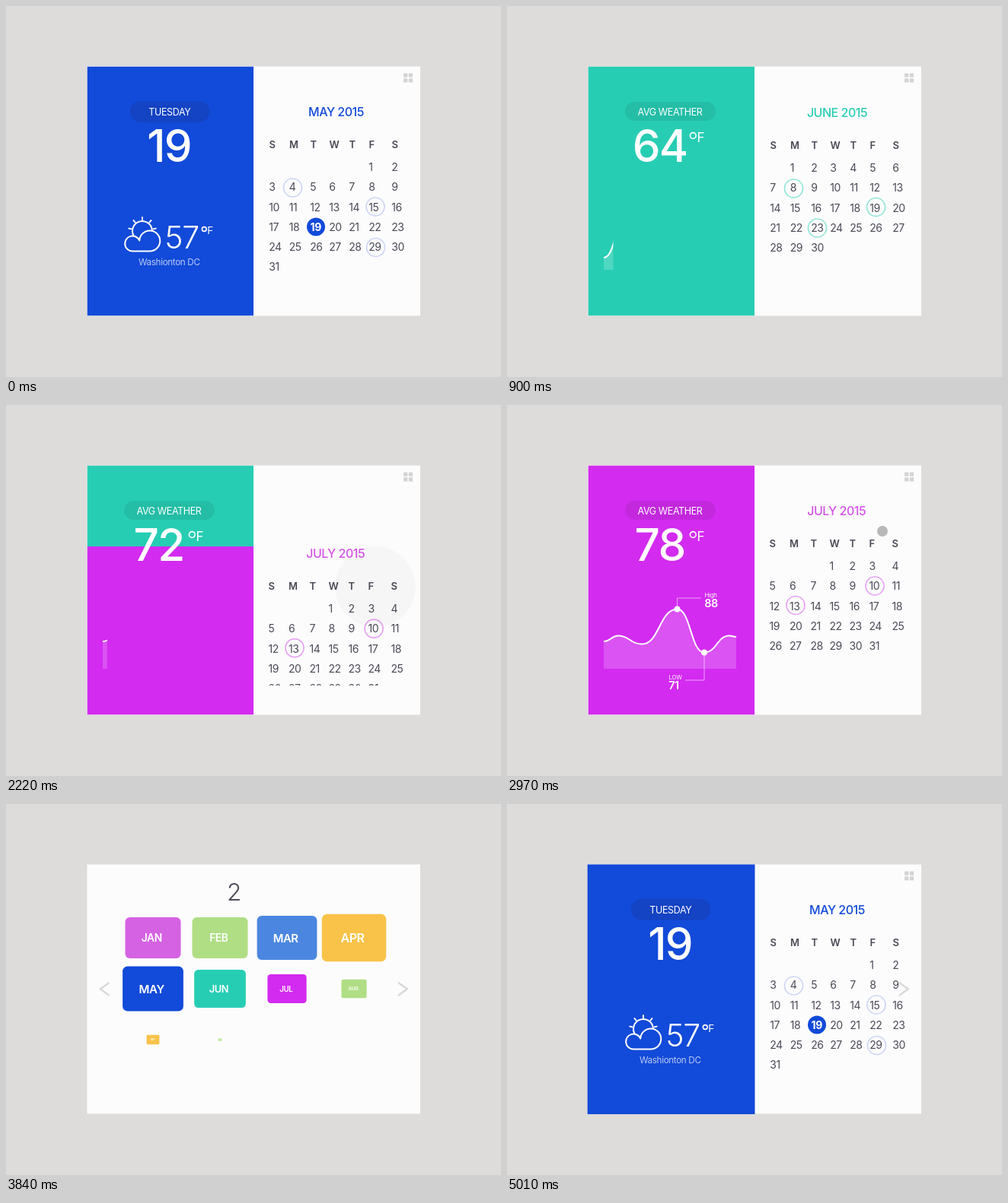
An HTML page with a canvas for the animation above (5.4 s loop, 650 by 488 pixels).

```html
<!DOCTYPE html>
<html lang="en">
<head>
<meta charset="utf-8">
<title>Calendar</title>
<style>
  html, body { margin: 0; width: 100%; height: 100%; overflow: hidden; background: #dddcda; }
  canvas { display: block; }
</style>
</head>
<body>
<canvas width="650" height="488"></canvas>
<script>
const ctx = document.querySelector('canvas').getContext('2d');
const LOOP = 5400, STEP = 30;
const CARD = { x: 106.5, y: 79.5, w: 437.5, h: 328, left: 218.5 };
const BLUE = '#124ad9', GREEN = '#27cdb3', PURPLE = '#d32bf0';
const COLUMNS = [346, 372.5, 400, 425, 451, 477, 507];

const MAY = {
  title: 'MAY 2015', color: BLUE, ink: BLUE, tint: '#cdd6f5', first: 5, days: 31, today: 19,
  dx: 0, dy: 0, rings: [[376.5, 239], [485, 264], [485.5, 317.5]]
};
const JUNE = {
  title: 'JUNE 2015', color: GREEN, ink: GREEN, tint: '#93e6d8', first: 1, days: 30,
  dx: 0, dy: 1, rings: [[376.5, 240], [484.5, 264.5], [407.5, 292]],
  start: 802, count: [64, 72],
  curve: [[127, 331], [160, 267], [236, 327], [276, 303], [301, 311]],
  high: { dot: [160, 267], turn: [252, 191], text: 196, value: 79, at: 190 },
  low: { dot: [236, 327], turn: [370, 256], text: 262, value: 58, at: 400 }
};
const JULY = {
  title: 'JULY 2015', color: PURPLE, ink: '#d453e6', tint: '#e8a2f5', first: 3, days: 31,
  dx: -0.8, dy: 0, rings: [[483, 238], [379, 263.5]],
  start: 2154, count: [72, 78],
  curve: [[127, 311], [146, 303.5], [177, 314.5], [223.5, 268.5], [259, 325.5], [292, 303.5], [301, 305]],
  high: { dot: [223.5, 268.5], turn: [254, 254.5], text: 260, value: 88, at: 320 },
  low: { dot: [259, 325.5], turn: [362, 234], text: 213, value: 71, at: 420 }
};

const TILES = [
  ['JAN', '#d562e2'], ['FEB', '#b0de84'], ['MAR', '#4b87e0'], ['APR', '#f9c349'],
  ['MAY', BLUE], ['JUN', GREEN], ['JUL', PURPLE], ['AUG', '#b0de84'],
  ['SEP', '#f9c349'], ['OCT', '#bdea9c'], ['NOV', '#4b87e0'], ['DEC', '#7ad6c8']
];

// Press time, tap time, start and end point of each pointer gesture.
const GESTURES = [
  [150, 330, 483, 376, 485, 235],
  [1620, 1800, 483, 376, 485, 235],
  [2850, 2970, 493, 166, 516, 110],
  [4110, 4290, 192, 245, 192, 245]
];

const lerp = (a, b, p) => a + (b - a) * p;
const ramp = (t, from, to) => Math.min(1, Math.max(0, (t - from) / (to - from)));
const smooth = (t, from, to) => { const p = ramp(t, from, to); return p * p * (3 - 2 * p); };

function layer(draw, alpha = 1) {
  if (alpha <= 0) return;
  ctx.save();
  ctx.globalAlpha *= alpha;
  draw();
  ctx.restore();
}

function clipped(x, y, w, h, draw) {
  layer(() => {
    ctx.beginPath();
    ctx.rect(x, y, w, h);
    ctx.clip();
    draw();
  });
}

function text(str, x, y, size, weight, color, align = 'left') {
  ctx.font = `${weight} ${size}px Inter, sans-serif`;
  ctx.letterSpacing = `${-0.03 * size}px`;
  ctx.textAlign = align;
  ctx.fillStyle = color;
  ctx.fillText(str, x, y);
}

function box(x, y, w, h, r, color) {
  ctx.beginPath();
  ctx.roundRect(x, y, w, h, r);
  ctx.fillStyle = color;
  ctx.fill();
}

function disc(x, y, r, color) {
  ctx.beginPath();
  ctx.arc(x, y, r, 0, 7);
  ctx.fillStyle = color;
  ctx.fill();
}

function ring(x, y, r, width, color) {
  ctx.beginPath();
  ctx.arc(x, y, r, 0, 7);
  stroke(width, color);
}

function stroke(width, color, path) {
  ctx.lineWidth = width;
  ctx.strokeStyle = color;
  path ? ctx.stroke(path) : ctx.stroke();
}

function polyline(points, width, color) {
  ctx.beginPath();
  points.forEach(p => ctx.lineTo(...p));
  stroke(width, color);
}

function calendar(m) {
  layer(() => {
    ctx.translate(m.dx, m.dy);
    text(m.title, 433.5, 144.8, 16, 500, m.ink, 'center');
    [...'SMTWTFS'].forEach((d, i) => text(d, COLUMNS[i] - 0.6, 186.8, 13, 600, '#4a4956'));
    for (let day = 1; day <= m.days; day++) {
      const cell = m.first + day - 1, x = COLUMNS[cell % 7];
      const y = 217.3 + 26.1 * Math.floor(cell / 7);
      if (day === m.today) {
        disc(407, 290.5, 12, m.color);
        text(day, 406.7, y, 14, 700, '#fff', 'center');
      } else {
        text(day, x - 0.8, y, 14, 400, '#4a4956');
      }
    }
  });
  m.rings.forEach(([x, y]) => ring(x, y, 12, 1.7, m.tint));
}

function weatherIcon() {
  ctx.lineCap = 'round';
  const cloud = new Path2D('M175.3 308.5A10 10 0 1 0 166 322.5H188.5A13.5 13.5 0 1 0 175.3 308.5');
  stroke(2, '#fff', cloud);
  ctx.beginPath();
  ctx.arc(179, 296, 13, 2.66, 6.25);
  stroke(2, '#fff');
  for (let i = 0; i < 5; i++) {
    const a = Math.PI * (1.06 + 0.22 * i), c = Math.cos(a), s = Math.sin(a);
    polyline([[179 + 15 * c, 296 + 15 * s], [179 + 18 * c, 296 + 18 * s]], 2, '#fff');
  }
}

function today() {
  box(163, 125, 104, 28, 14, '#1443c3');
  text('TUESDAY', 214.8, 143.8, 12.5, 400, '#fff', 'center');
  text('19', 214, 204.5, 58.5, 500, '#fff', 'center');
  layer(weatherIcon);
  text('57', 208.8, 318.5, 41, 300, '#fff');
  ring(260.3, 293.5, 2.9, 1.6, '#fff');
  text('F', 264.2, 300, 13.5, 400, '#fff');
  text('Washionton DC', 214.3, 341, 11.7, 400, 'rgba(255,255,255,.7)', 'center');
}

function callout({ dot: [x, y], turn: [turnY, endX], text: textX, value, at }, name, time) {
  layer(() => {
    disc(x, y, 4, '#fff');
    polyline([[x, y], [x, turnY], [endX, turnY]], 0.7, 'rgba(255,255,255,.8)');
  }, smooth(time, at, at + 150));
  layer(() => {
    text(name, textX - 0.5, turnY - 1.3, 7.8, 400, '#fff');
    text(value, textX - 0.8, turnY + 12.3, 14.5, 600, '#fff');
  }, smooth(time, at + 100, at + 268));
}

function chart(m, t) {
  const time = t - m.start, path = new Path2D();
  m.curve.forEach(([x, y], i) => {
    if (!i) return path.moveTo(x, y);
    const [px, py] = m.curve[i - 1], mid = (x + px) / 2;
    path.bezierCurveTo(mid, py, mid, y, x, y);
  });
  clipped(127, 240, 174 * smooth(time, 0, 600), 110, () => {
    const area = new Path2D(path);
    area.lineTo(301, 347);
    area.lineTo(127, 347);
    ctx.fillStyle = 'rgba(255,255,255,.19)';
    ctx.fill(area);
    stroke(2, '#fff', path);
  });
  callout(m.high, 'High', time);
  callout(m.low, 'LOW', time);
}

function average(m, t) {
  box(155, 126, 119, 25, 12.5, 'rgba(0,0,0,.08)');
  text('AVG WEATHER', 214, 143.8, 12.5, 400, '#fff', 'center');
  const value = lerp(...m.count, smooth(t, m.start + 80, m.start + 580));
  text(Math.round(value), 200.5, 205, 58.5, 500, '#fff', 'center');
  ring(244.3, 170.5, 3.9, 1.6, '#fff');
  text('F', 249.5, 178.5, 17, 400, '#fff');
  chart(m, t);
}

function leftPanel(m, t) {
  box(CARD.x, CARD.y, CARD.left, CARD.h, 0, m.color);
  m.curve ? average(m, t) : today();
}

function gridIcon() {
  for (const x of [522, 528.8]) for (const y of [88.5, 95.2]) box(x, y, 5.3, 5.3, 0.5, '#d4d4d4');
}

function swipe(from, to, start, t) {
  const rest = CARD.h * (1 - smooth(t, start + 225, start + 540));
  clipped(CARD.x, CARD.y, CARD.left, rest, () => leftPanel(from, t));
  clipped(CARD.x, CARD.y + rest, CARD.left, CARD.h - rest, () => leftPanel(to, t));
  const slide = 330 * smooth(t, start + 110, start + 530);
  clipped(326, 105, 217, 264, () => {
    ctx.translate(0, -slide);
    calendar(from);
    ctx.translate(0, 330);
    if (slide) calendar(to);
  });
  gridIcon();
}

function popScale(time) {
  return time < 210 ? 1.157 * smooth(time, 0, 210) : lerp(1.157, 1, ramp(time, 210, 270));
}

function tile(i, scale) {
  const [name, color] = TILES[i];
  layer(() => {
    ctx.translate(193 + 88 * (i % 4), 176 + 67 * Math.floor(i / 4));
    ctx.scale(scale, scale);
    box(-36.5, -27, 73, 54, 6, color);
    text(name, -1.7, 5.2, 13.8, 600, '#fff', 'center');
  });
}

function yearView(t) {
  layer(() => {
    const typed = Math.floor((t - 3750) / 60);
    text('2015'.slice(0, Math.max(0, Math.min(4, typed))), 290, 126.5, 31.5, 300, '#4a4956');
    TILES.forEach((_, i) => {
      const scale = popScale(t - 3540 - 30 * i);
      if (scale > 0) tile(i, scale);
    });
  }, 1 - smooth(t, 4470, 4740));
}

function arrows(t) {
  layer(() => {
    polyline([[135.5, 235], [124, 243.3], [135.5, 252]], 2.5, '#d9d9d9');
    polyline([[515, 235], [526.8, 243.3], [515, 252]], 2.5, '#d9d9d9');
  }, smooth(t, 3540, 3700));
}

function openYear(t) {
  yearView(t);
  layer(() => calendar(JULY), 1 - smooth(t, 3100, 3420));
  layer(gridIcon, 1 - smooth(t, 3510, 3700));
  arrows(t);
  const width = CARD.left * (1 - smooth(t, 3150, 3582));
  clipped(CARD.x, CARD.y, width, CARD.h, () => leftPanel(JULY, t));
}

function openMay(t) {
  const p = smooth(t, 4470, 4904), show = smooth(t, 4800, 5000);
  yearView(t);
  layer(() => calendar(MAY), show);
  layer(gridIcon, show);
  arrows(t);
  box(lerp(156.5, 105.7, p), lerp(216, 79.5, p), lerp(73, 219.8, p), lerp(54, 328.5, p), 6 * (1 - p), BLUE);
  layer(() => text('MAY', lerp(191.3, 214, p), 248.2, 13.8, 600, '#fff', 'center'), 1 - smooth(t, 4500, 4740));
  layer(today, show);
}

function pointer(t) {
  for (const [press, tap, x0, y0, x1, y1] of GESTURES) {
    if (t < press || t >= tap + 432) continue;
    const k = ramp(t, tap, tap + 432), grow = k ** 3;
    disc(lerp(x0, x1, k), lerp(y0, y1, k), 7 + 50 * grow, `rgba(0,0,0,${0.27 * (1 - grow)})`);
  }
}

function render(t) {
  box(0, 0, 650, 488, 0, '#dddcda');
  box(CARD.x, CARD.y, CARD.w, CARD.h, 0, '#fcfcfc');
  if (t < 1620) swipe(MAY, JUNE, 330, t);
  else if (t < 2970) swipe(JUNE, JULY, 1800, t);
  else if (t < 4470) openYear(t);
  else openMay(t);
  pointer(t);
}

const begin = performance.now();
function tick() {
  const t = (performance.now() - begin) % LOOP;
  render(Math.floor(t / STEP) * STEP);
  requestAnimationFrame(tick);
}
tick();
</script>
</body>
</html>
```
